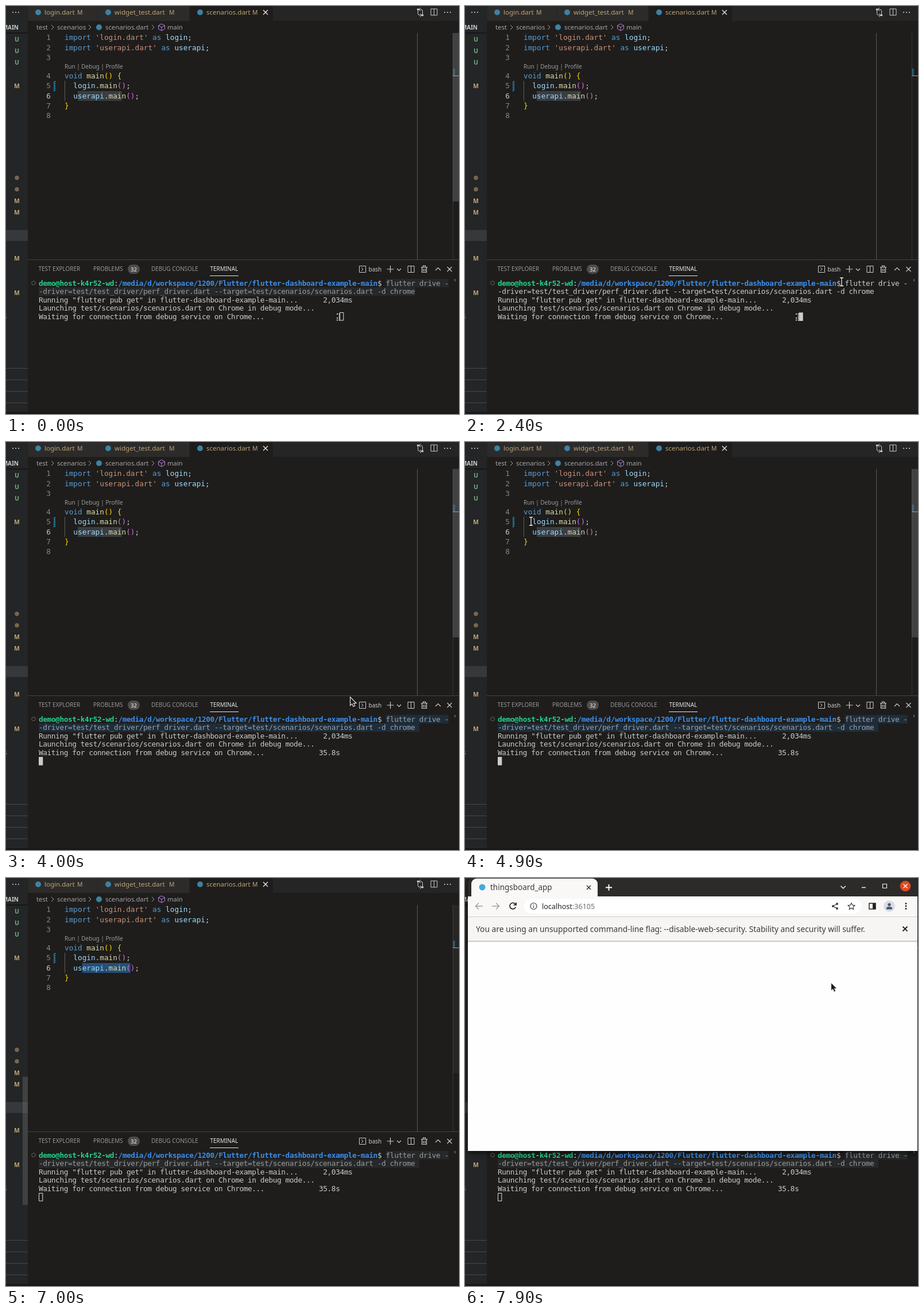
Animation, 789 px wide and 710 px high, one loop 8000 ms. Source, as an HTML page with a canvas:

```html
<!DOCTYPE html>
<html lang="en">
<head>
<meta charset="utf-8">
<title>Editor and browser</title>
<style>
html, body { margin: 0; width: 100%; height: 100%; overflow: hidden; background: #1e1d1c; }
canvas { display: block; }
</style>
</head>
<body>
<canvas id="stage" width="789" height="710"></canvas>
<script>
const ctx = document.getElementById('stage').getContext('2d');
const UI = '"Noto Sans", sans-serif', MONO = '"DejaVu Sans Mono", monospace';
const LOOP = 8000, STEP = 100;
const HOLDS = [1800, 2100, 4600, 5000, 5900, 6100, 7100];
const CELL = 7.284, ROW = 14.6, TERM_X = 57, TERM_Y = 475;
const CHAR = 7.655, CODE_X = 102;
const BG = '#1e1d1c', GREY = '#cccccc', BLUE = '#569cd6', PALE = '#9cdcfe',
  FN = '#dcdcaa', STR = '#ce9178', GOLD = '#ffd700', PINK = '#da70d6', MOD = '#bda478';

// time, x, y of the pointer; points off the stage hide it
const PATH = [
  [0, 150, -30], [100, 150, 10], [400, 400, 300], [700, 640, 622], [900, 770, 300], [1000, 720, 118],
  [1500, 664, 474], [1900, 668, 482], [2000, 656, 482], [2400, 656, 480], [2500, 661, 482],
  [2700, 720, 484], [2900, 716, 498], [3300, 719, 501], [3700, 640, 260], [4000, 600, 445],
  [4300, 260, 16], [4500, 196, 160], [4700, 190, 160], [4900, 115, 138], [5000, 115, 138], [5300, 420, 10],
  [5500, 217, 156], [5800, 186, 156], [6000, 134, 156], [6200, 105, 230], [6500, 25, 400],
  [6800, 12, 555], [6900, -30, 560], [7000, 830, 330], [7500, 830, 330], [7800, 638, 183], [8000, 638, 183]
];

const clamp = (v, a = 0, b = 1) => Math.min(b, Math.max(a, v));
const ramp = (t, a, b) => clamp((t - a) / (b - a));

function pointerAt(t) {
  const i = PATH.findIndex((p, n) => n && p[0] >= t) || 1;
  const [t0, x0, y0] = PATH[i - 1], [t1, x1, y1] = PATH[i];
  const k = ramp(t, t0, t1), e = k * k * (3 - 2 * k);
  return { x: x0 + (x1 - x0) * e, y: y0 + (y1 - y0) * e };
}

function rect(x, y, w, h, color) {
  ctx.fillStyle = color;
  ctx.fillRect(x, y, w, h);
}
function round(x, y, w, h, r, color) {
  ctx.fillStyle = color;
  ctx.beginPath();
  ctx.roundRect(x, y, w, h, r);
  ctx.fill();
}
const dot = (x, y, r, color) => round(x - r, y - r, 2 * r, 2 * r, r, color);
function stroke(d, color, width = 1) {
  ctx.strokeStyle = color;
  ctx.lineWidth = width;
  ctx.stroke(new Path2D(d));
}
function text(s, x, y, color, size, { font = UI, weight = '', align = 'left', gap = 0 } = {}) {
  ctx.font = `${weight} ${size}px ${font}`;
  ctx.letterSpacing = gap + 'px';
  ctx.textAlign = align;
  ctx.fillStyle = color;
  ctx.fillText(s, x, y);
}
function ellipsis(x, y, color) {
  for (const dx of [-5, 0, 5]) dot(x + dx, y, 1.1, color);
}
function splitIcon(x, y) {
  stroke(`M${x - 5.5} ${y - 5.5}h11v11h-11zM${x} ${y - 5.5}v11`, GREY);
}

function sidebar(t) {
  rect(0, 0, 38, 710, '#232526');
  rect(0, 390, 38, 19, '#37383b');
  ellipsis(17, 11, GREY);
  text('MAIN', 22, 40.5, GREY, 10, { weight: 'bold', align: 'right' });
  rect(0, 46, 38, 2, '#151617');
  const mark = (s, y, color) => text(s, 19, y + 3.5, color, 10.5, { weight: '600', align: 'center' });
  for (const y of [58, 78, 98]) mark('U', y, '#6fae7c');
  for (const y of [139, 339, 359, 439, 499]) mark('M', y, MOD);
  for (const y of [299, 319]) dot(19, y, 3.8, '#79664f');
  text('s', -3, 544, '#888', 10);
  for (const y of [630, 650, 670, 690]) rect(0, y, 38, 1, '#47494a');
  const alpha = t < 6500 ? 0 : 1 - ramp(t, 7100, 7800);
  rect(29, 346, 9, 223, `rgba(121,121,121,${0.33 * alpha})`);
}

function tabs() {
  rect(38, 0, 751, 26, '#252526');
  rect(39, 0, 121, 26, '#2c2b2a');
  rect(161, 0, 158, 26, '#2c2b2a');
  rect(320, 0, 145, 26, BG);
  for (const [name, x, markX] of [['login.dart', 67, 124], ['widget_test.dart', 189, 284], ['scenarios.dart', 349, 429]]) {
    dot(x - 11, 11, 5, '#3c82a3');
    text(name, x, 14.5, MOD, 11.5);
    text('M', markX, 14.5, MOD, 10.5);
  }
  stroke('M448 7l8 8m0-8l-8 8', '#e8e8e8', 1.3);
  stroke('M717.5 7v6q0 3 3 3h3M721 13l3 3-3 3M725.5 15V9q0-3-3-3h-3M722 3l-3 3 3 3', GREY);
  dot(717.5, 6, 1.8, GREY);
  dot(725.5, 16, 1.8, GREY);
  splitIcon(745.5, 10.5);
  ellipsis(769, 11, GREY);

  const crumb = (s, x) => text(s, x, 40.5, '#a5a5a5', 11.3);
  crumb('test', 53);
  crumb('scenarios', 89);
  crumb('scenarios.dart', 173);
  crumb('main', 281);
  for (const x of [79, 144, 254]) stroke(`M${x} 33l4 4-4 4`, '#a5a5a5');
  dot(162, 37, 5, '#3c82a3');
  stroke('M271 31l5.5 3v6l-5.5 3-5.5-3v-6zM265.5 34l5.5 3 5.5-3M271 37v6', '#b180d7');
}

const IMPORT = (file, name) => [['import ', BLUE], [`'${file}'`, STR], [' as ', BLUE], [name, PALE], [';', GREY]];
const CALL = name => [['  ' + name, PALE], ['.', GREY], ['main', FN], ['()', PINK], [';', GREY]];
const CODE = [
  IMPORT('login.dart', 'login'), IMPORT('userapi.dart', 'userapi'), [],
  [['void ', BLUE], ['main', FN], ['() {', GOLD]], CALL('login'), CALL('userapi'), [['}', GOLD]], []
];
const codeBaseline = i => (i < 3 ? 59.3 : 73.5) + 17.4 * i;

function editor(t, mouse) {
  let from = 3, to = 13, color = '#3a3d41';
  if (t >= 5500) {
    to = 15;
    from = t >= 6000 ? 4 : Math.round((mouse.x - CODE_X) / CHAR);
    color = '#264f78';
  }
  rect(CODE_X + from * CHAR, 148, (to - from) * CHAR, 17, color);
  rect(102, 130, 1, 35, '#5c5c5a');
  for (let y = 131; y < 147; y += 3) stroke(`M83 ${y + 2}l3-2`, '#2787b5', 1.6);

  CODE.forEach((line, i) => {
    const y = codeBaseline(i);
    text(i + 1, 78, y, i === 5 ? '#c6c6c6' : '#858585', 12.72, { font: MONO, align: 'right' });
    let col = 0;
    for (const [s, c] of line) {
      text(s, CODE_X + col * CHAR, y, c, 12.72, { font: MONO });
      col += s.length;
    }
  });
  text('Run | Debug | Profile', 102, 109, '#999', 10);

  rect(716, 47, 1, 394, '#5a5a59');
  rect(778, 47, 1, 394, '#343433');
  rect(778, 109, 4, 12, '#22566d');
  let alpha = 1 - ramp(t, 100, 900);
  if (t > 3400) alpha = ramp(t, 3400, 3700) * (1 - ramp(t, 6400, 7200));
  rect(778, 47, 11, 293, `rgba(121,121,121,${0.4 * alpha})`);
  rect(778, 121, 11, 1, '#a0a0a0');
}

function panelHeader() {
  rect(38, 441, 751, 1, '#454544');
  const label = (s, x, c = '#979797') => text(s, x, 461.3, c, 9.95);
  label('TEST EXPLORER', 56.5);
  label('PROBLEMS', 152);
  label('DEBUG CONSOLE', 253);
  label('TERMINAL', 355.5, '#e7e7e7');
  rect(355, 469, 50, 1, '#e7e7e7');
  round(212, 450, 21, 16, 8, '#4d4d4d');
  text('32', 222.5, 461.5, '#fff', 9.5, { align: 'center' });
  stroke('M615.5 452.5h11v11h-11zM619 455l3 3-3 3', GREY);
  text('bash', 631.5, 461.5, GREY, 10);
  stroke('M669.5 452v12M663.5 458h12M681 457l3.5 3.5 3.5-3.5M748 460l4.5-4.5 4.5 4.5', GREY, 1.2);
  splitIcon(705.5, 458);
  stroke('M723 454.5h11M726.5 454v-2h4v2M724.5 455v8.5h8V455M727 457v5M730 457v5', GREY, 1.2);
  stroke('M768.5 454l8 8m0-8l-8 8', GREY, 1.2);
}

const HOST = 'demo@host-k4r52-wd', DIR = '/media/d/workspace/1200/Flutter/flutter-dashboard-example-main';
const COMMAND = ['flutter drive -', '-driver=test/test_driver/perf_driver.dart --target=test/scenarios/scenarios.dart -d chrome'];
const COMMAND_COL = 83;

function term(s, col, row, color = GREY, weight = '') {
  text(s, TERM_X + col * CELL, TERM_Y + row * ROW + 11.6, color, 12.74, { font: MONO, weight, gap: CELL - 12.74 * 0.60205 });
}

// selected column ranges of the two command rows
function terminalSelection(t, mouse) {
  if (t < 1700) return [[COMMAND_COL, 98], [0, 90]];
  if (t < 2500) return [];
  if (t >= 3300) return [[COMMAND_COL, 98], [0, 91]];
  const col = Math.round((mouse.x - TERM_X) / CELL);
  return mouse.y < TERM_Y + ROW ? [[COMMAND_COL, clamp(col, COMMAND_COL, 98)]] : [[COMMAND_COL, 98], [0, clamp(col, 0, 91)]];
}

function spinner(t) {
  const ring = [[0, 0], [1, 0], [1, 1], [1, 2], [1, 3], [0, 3], [0, 2], [0, 1]];
  const gap = Math.floor(t / STEP + 7) % 8;
  ring.forEach(([x, y], i) => {
    if (i !== gap) rect(576 + x * 3.6, 535 + y * 3.5, 2, 2, GREY);
  });
}

function terminal(t, mouse) {
  const focused = t >= 1700 && t < 5500, done = t >= 3600;
  const selection = terminalSelection(t, mouse);
  const textColor = focused ? '#93a3af' : '#9b9b9b';
  ctx.strokeStyle = '#646464';
  ctx.lineWidth = 1;
  ctx.beginPath();
  ctx.arc(48, 482, 3.3, 0, 7);
  ctx.stroke();
  selection.forEach(([a, b], row) =>
    rect(TERM_X + a * CELL, TERM_Y + row * ROW, (b - a) * CELL, ROW, focused ? '#1f2d39' : '#272829'));

  term(HOST, 0, 0, '#23d18b', 'bold');
  term(':', 18, 0);
  term(DIR, 19, 0, '#3b8eea', 'bold');
  term('$', 81, 0);
  COMMAND.forEach((s, row) => {
    const start = row ? 0 : COMMAND_COL;
    const n = selection[row] ? selection[row][1] - start : 0;
    term(s.slice(0, n), start, row, textColor);
    term(s.slice(n), start + n, row);
  });
  term('Running "flutter pub get" in flutter-dashboard-example-main...', 0, 2);
  term('2,034ms', 68, 2);
  term('Launching test/scenarios/scenarios.dart on Chrome in debug mode...', 0, 3);
  term('Waiting for connection from debug service on Chrome...', 0, 4);
  if (done) term('35.8s', 67, 4);
  else spinner(t);

  const x = TERM_X + (done ? 0 : 72) * CELL, y = TERM_Y + (done ? 5 : 4) * ROW;
  if (focused) rect(x, y, CELL, ROW, GREY);
  else stroke(`M${Math.round(x) + 0.5} ${Math.round(y) + 0.5}h6.3v13.5h-6.3z`, '#e0e0e0');
  rect(781, 475, 2, 4, '#5b5b5a');
}

function browser(t) {
  const ink = '#3c3b3a', dark = '#222';
  ctx.save();
  ctx.shadowColor = 'rgba(0,0,0,.6)';
  ctx.shadowBlur = 10;
  ctx.shadowOffsetY = 3;
  round(5, 0, 783, 475, [8, 8, 0, 0], '#2d2b2a');
  ctx.restore();

  round(11, 1, 220, 36, [9, 9, 0, 0], '#faf8f7');
  rect(5, 32, 783, 35, '#faf8f7');
  dot(30, 16, 5.5, '#48a9dc');
  text('thingsboard_app', 44, 21, ink, 13.5);
  stroke('M212 13l7 7m0-7l-7 7', ink, 1.6);
  stroke('M250.5 11v11M245 16.5h11', '#fff', 1.8);
  stroke('M654.5 14l4.2 4 4.2-4M691 16.5h7', '#eee', 1.6);
  stroke('M727.5 10.5h7v7h-7z', '#eee', 1.2);
  dot(767, 14, 9.3, '#df4a20');
  stroke('M763.5 10.5l7 7m0-7l-7 7', '#fff', 1.4);

  const arrow = (x, d, c) => stroke(`M${x + 6 * d} 49h${-12 * d}m${5 * d}-5.5l${-5.5 * d} 5.5 ${5.5 * d} 5.5`, c, 1.5);
  arrow(25, 1, '#a3a1a0');
  arrow(53, -1, '#a3a1a0');
  stroke('M88 46a5.3 5.3 0 1 0 .3 4.5M89 42.5v4.5h-4.5', dark, 1.7);
  round(103, 36, 587, 26, 13, '#fff');
  stroke('M125 49a5.5 5.5 0 1 1-11 0a5.5 5.5 0 1 1 11 0M119.5 48v4M119.5 45.5v1.3', ink, 1.2);
  text('localhost', 134, 53.5, dark, 12.5);
  text(':36105', 187, 53.5, '#706e6c', 12.5);
  stroke('M648 45l-7 4 7 4', ink, 1.2);
  for (const [x, y] of [[648, 45], [641, 49], [648, 53]]) dot(x, y, 2, ink);
  stroke('M673 43.5l1.8 3.7 4.1.5-3 2.8.8 4-3.7-2-3.7 2 .8-4-3-2.8 4.1-.5z', ink, 1.2);
  stroke('M704 44h11v10h-11z', dark, 1.5);
  rect(710, 44, 5, 10, dark);
  dot(739, 49, 10, '#d8dde5');
  dot(739, 46.3, 2.6, '#46556b');
  round(733.8, 50, 10.4, 4.5, [4, 4, 0, 0], '#46556b');
  for (const y of [44.5, 49, 53.5]) dot(768, y, 1.4, dark);

  rect(5, 67, 783, 43, '#f7f5f4');
  rect(5, 67, 783, 1, '#d2d0ce');
  text('You are using an unsupported command-line flag: --disable-web-security. Stability and security will suffer.', 19, 94, ink, 13.78);
  stroke('M762.5 84.5l8 8m0-8l-8 8', dark, 1.8);
  rect(5, 110, 783, 365, '#fefefe');
  if (t < 7600) {
    const end = 417 + 371 * ramp(t, 7200, 7600);
    rect(5, 110, 783, 8, '#2299e4');
    rect(5, 110, end - 5, 8, '#2866ac');
  } else {
    rect(5, 109.5, 783, 1, '#a09f9e');
    rect(5, 110.5, 783, 1, '#dddcdb');
  }
}

function pointer({ x, y }, browsing) {
  const overText = !browsing && x > 102 && x < 778 && ((y > 47 && y < 440) || y > 471);
  if (overText) {
    const beam = `M${x - 3} ${y - 7}h2.2q.8 0 .8.8v12.4q0 .8-.8.8h-2.2M${x + 3} ${y - 7}h-2.2q-.8 0-.8.8v12.4q0 .8.8.8h2.2`;
    stroke(beam, '#000', 3);
    stroke(beam, '#fff', 1.3);
  } else {
    const shape = new Path2D(`M${x} ${y}v12.5l2.9-2.7 2.2 4.9 2-1-2.2-4.7h4z`);
    ctx.strokeStyle = '#fff';
    ctx.lineWidth = 2;
    ctx.stroke(shape);
    ctx.fillStyle = '#1b1b1b';
    ctx.fill(shape);
  }
}

function draw(now) {
  let t = Math.floor((now % LOOP) / STEP) * STEP;
  if (HOLDS.includes(t)) t -= STEP;
  const mouse = pointerAt(t), browsing = t >= 7200;
  rect(0, 0, 789, 710, BG);
  sidebar(t);
  tabs();
  editor(t, mouse);
  panelHeader();
  terminal(t, mouse);
  rect(0, 707, 789, 3, '#191817');
  if (browsing) browser(t);
  pointer(mouse, browsing);
}

const start = performance.now();
function frame() {
  draw(performance.now() - start);
  requestAnimationFrame(frame);
}
frame();
</script>
</body>
</html>
```
